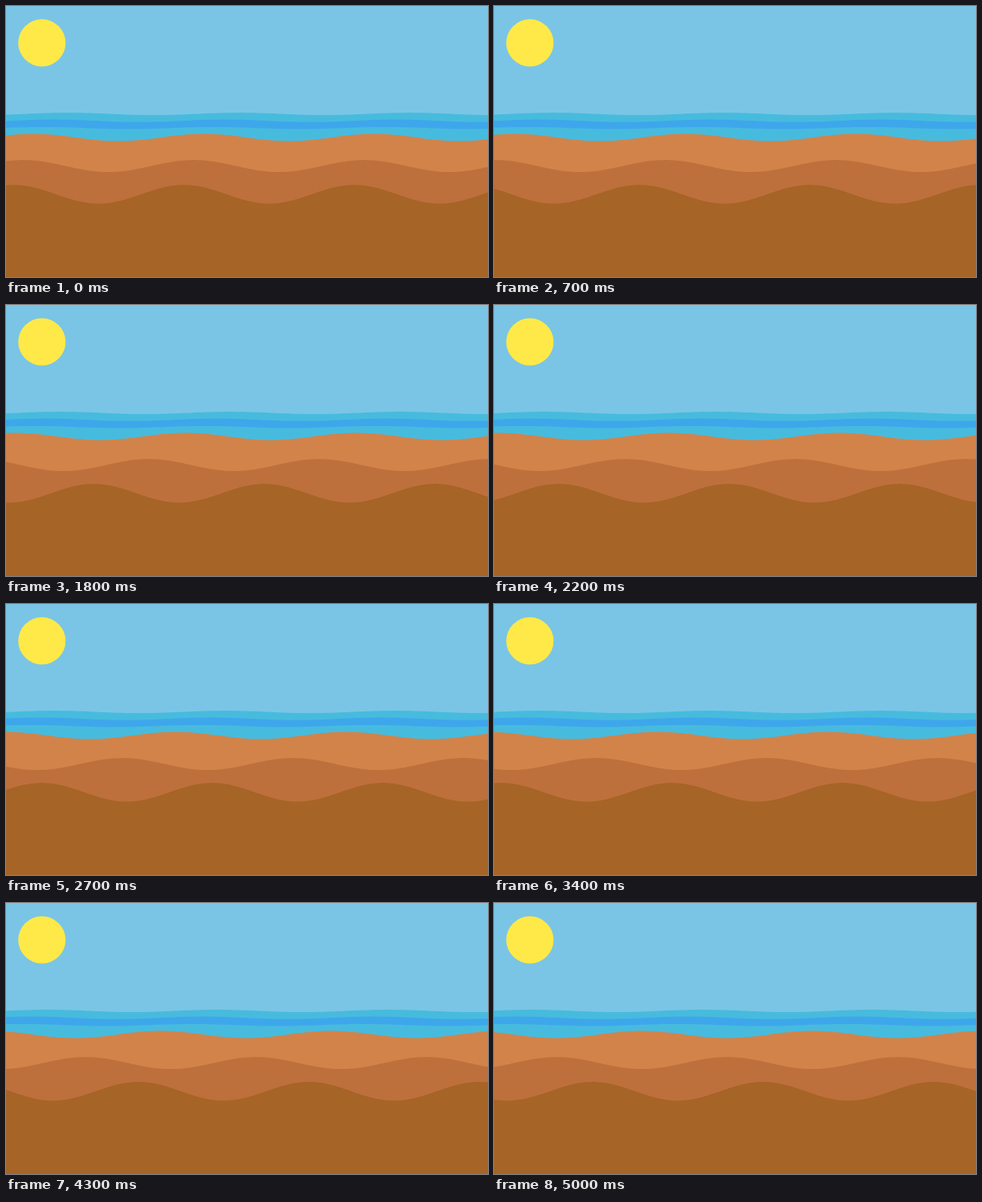
An HTML page with a canvas that plays this animation: 600x338 px, repeating every 5100 ms.

```html
<!DOCTYPE html>
<html lang="en">
<head>
<meta charset="utf-8">
<title>Dunes by the sea</title>
<style>
html, body { margin: 0; height: 100%; overflow: hidden; }
canvas { display: block; }
</style>
</head>
<body>
<canvas id="scene" width="600" height="338"></canvas>
<script>
const ctx = document.getElementById('scene').getContext('2d');
const LOOP = 5100, STEP = 100, WAVE = 212.3;

// Back to front: colour, mean height, amplitude, crest position, share of the front speed
const layers = [
  ['#47bbdd', 134.6, 1.5, 290, 0.1],
  ['#3ea7ec', 143.2, 1.6, 272, 0.1],
  ['#47bbdd', 152.2, 1.3, 259, 0.1],
  ['#d2834a', 164.0, 4.5, 246, 0.2],
  ['#be703c', 199.6, 7.5, 233.5, 0.5],
  ['#a66427', 234.8, 11.7, 221.3, 1]
];

// Distance travelled by the front dune: [ms, px]; flat parts are pauses
const travel = [[0, 0], [400, 26], [500, 26], [700, 40.5], [1600, 105], [1700, 105],
  [1800, 112], [2700, 177], [3400, 212.3], [4300, 269], [5000, 311]];

function distance(t) {
  const i = Math.max(1, travel.findIndex(([time]) => time >= t));
  const [t0, d0] = travel[i - 1], [t1, d1] = travel[i];
  return d0 + (d1 - d0) * (t - t0) / (t1 - t0);
}

function drawLayer([color, y, amp, crest, speed], shift) {
  ctx.fillStyle = color;
  ctx.beginPath();
  ctx.moveTo(0, 338);
  for (let x = 0; x <= 600; x += 2) {
    ctx.lineTo(x, y - amp * Math.cos((x - crest + shift * speed) * 2 * Math.PI / WAVE));
  }
  ctx.lineTo(600, 338);
  ctx.fill();
}

function draw() {
  const time = Math.floor(performance.now() % LOOP / STEP) * STEP;
  const shift = distance(time);
  ctx.fillStyle = '#7ac5e5';
  ctx.fillRect(0, 0, 600, 338);
  ctx.fillStyle = '#ffe948';
  ctx.beginPath();
  ctx.arc(44.7, 46, 29.5, 0, 2 * Math.PI);
  ctx.fill();
  for (const layer of layers) drawLayer(layer, shift);
  requestAnimationFrame(draw);
}
draw();
</script>
</body>
</html>
```
